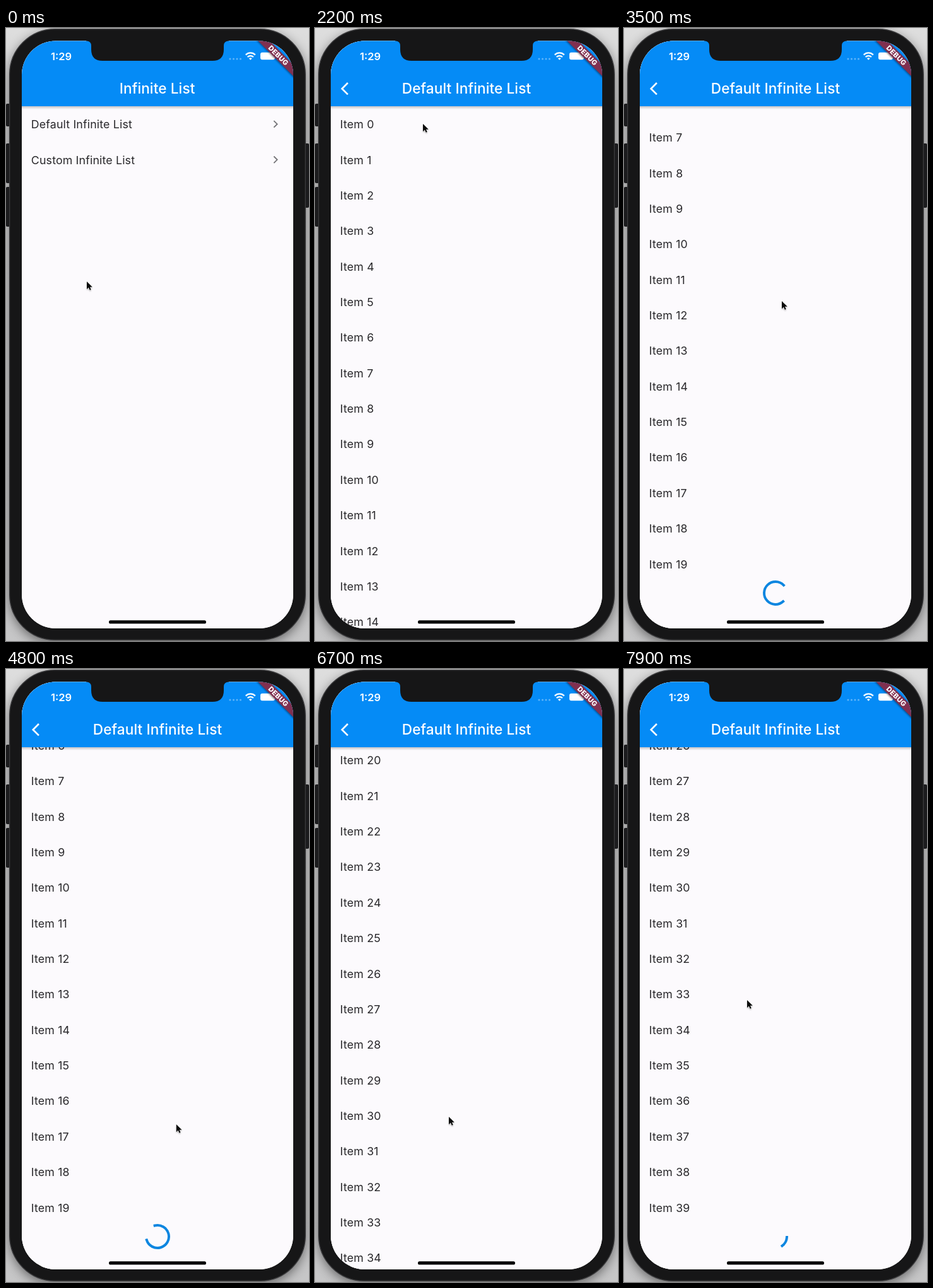
Recreate the animation shown at these times as an HTML page. Size 480 px wide and 972 px high, loop 8000 ms.

```html
<!DOCTYPE html>
<html lang="en">
<head>
<meta charset="utf-8">
<title>Infinite List</title>
<style>
  html, body { margin: 0; width: 100%; height: 100%; overflow: hidden; background: #c4c4c5; }
  svg { display: block; width: 480px; height: 972px; font-family: Inter, Roboto, sans-serif; }
  .row { font-size: 17.8px; letter-spacing: .15px; fill: #29282b; }
  .title { font-size: 22.6px; letter-spacing: .1px; font-weight: 500; fill: #fff; text-anchor: middle; }
  .line { fill: none; stroke-linecap: square; stroke-linejoin: miter; }
</style>
</head>
<body>
<svg viewBox="0 0 480 972">
  <defs>
    <linearGradient id="desk" x2="0" y2="1">
      <stop offset="0" stop-color="#dedede"/>
      <stop offset=".12" stop-color="#cdcdce"/>
      <stop offset="1" stop-color="#c6c6c7"/>
    </linearGradient>
    <linearGradient id="shade" x2="0" y2="1">
      <stop offset="0" stop-color="#000" stop-opacity=".22"/>
      <stop offset="1" stop-color="#000" stop-opacity="0"/>
    </linearGradient>
    <filter id="blur" x="-20%" y="-20%" width="140%" height="140%"><feGaussianBlur stdDeviation="9"/></filter>
    <filter id="soft" x="-50%" y="-50%" width="200%" height="200%"><feGaussianBlur stdDeviation="1.2"/></filter>
    <clipPath id="screen"><rect x="25" y="20.4" width="430" height="931.6" rx="54"/></clipPath>
    <g id="bar">
      <rect x="25" y="20" width="430" height="104" fill="#058bf6"/>
      <rect x="25" y="124" width="430" height="5" fill="url(#shade)"/>
    </g>
    <path id="arrow" d="M0 0V13.2L3.1 10.3L5.2 15L7.4 14L5.4 9.4H9.6Z" transform="scale(.92)"/>
  </defs>

  <!-- phone body -->
  <rect width="480" height="972" fill="url(#desk)"/>
  <rect x="6" y="6" width="468" height="970" rx="73" opacity=".5" filter="url(#blur)"/>
  <g fill="#1b1b1d">
    <rect x="0" y="120" width="8" height="36" rx="2"/>
    <rect x="0" y="183" width="8" height="63" rx="2"/>
    <rect x="0" y="252" width="8" height="63" rx="2"/>
    <rect x="472" y="183" width="8" height="102" rx="2"/>
  </g>
  <rect x="5.7" y="1.7" width="468.6" height="968.6" rx="72" fill="#161617" stroke="#39393b" stroke-width="1.4"/>

  <g clip-path="url(#screen)">
    <rect x="25" y="20" width="430" height="932" fill="#fcfafd"/>
    <g id="home">
      <rect x="25" y="20" width="430" height="932" fill="#fcfafd"/>
      <rect id="press" x="25" y="124" width="430" height="56.4" fill="#000" opacity="0"/>
      <text class="row" x="39.8" y="159.2">Default Infinite List</text>
      <text class="row" x="39.8" y="215.6">Custom Infinite List</text>
      <g class="line" stroke="#77767a" stroke-width="1.9">
        <path d="M425 147.8l4.6 4.6l-4.6 4.6"/>
        <path d="M425 204.2l4.6 4.6l-4.6 4.6"/>
      </g>
      <use href="#bar"/>
      <text class="title" x="239.6" y="104">Infinite List</text>
    </g>
    <g id="page">
      <rect x="25" y="20" width="430" height="932" fill="#fcfafd"/>
      <g id="rows"></g>
      <path id="spinner" class="line" stroke="#0d86e0" stroke-width="4"/>
      <use href="#bar"/>
      <path class="line" d="M51 88L42.8 96.2L51 104.4" stroke="#fff" stroke-width="2.7"/>
      <text class="title" x="240" y="104">Default Infinite List</text>
    </g>

    <!-- status bar -->
    <text x="87.6" y="51" font-size="16.6" font-weight="600" fill="#fff" text-anchor="middle">1:29</text>
    <g fill="#fff" opacity=".35">
      <circle cx="355" cy="49" r="1.6"/><circle cx="360.5" cy="49" r="1.6"/>
      <circle cx="366" cy="49" r="1.6"/><circle cx="371.5" cy="49" r="1.6"/>
    </g>
    <g fill="none" stroke="#fff" stroke-width="2.3">
      <path d="M379.8 42.6A10.5 10.5 0 0 1 394.8 42.6"/>
      <path d="M382.7 46A6.4 6.4 0 0 1 391.9 46"/>
    </g>
    <path d="M384.9 48.2a3.6 3.6 0 0 1 4.8 0L387.3 50.8Z" fill="#fff"/>
    <rect x="403" y="38.8" width="23" height="11.4" rx="3" fill="#fff"/>

    <!-- corner ribbon -->
    <g transform="translate(431.6 43.6) rotate(45)">
      <rect x="-60" y="-6" width="120" height="14" opacity=".4" filter="url(#soft)"/>
      <rect x="-60" y="-6.4" width="120" height="12.8" fill="#803050"/>
      <text y="3.9" font-size="11" letter-spacing=".3" font-weight="800" fill="#fff" text-anchor="middle">DEBUG</text>
    </g>
    <rect x="163" y="939.3" width="154" height="5.2" rx="2.6" fill="#050505"/>
  </g>
  <path d="M127 19V20.4Q135 20.4 135 28V34Q135 52 153 52H327Q345 52 345 34V28Q345 20.4 353 20.4V19Z" fill="#161617"/>

  <g id="cursor">
    <use href="#arrow" y="1.5" opacity=".4" filter="url(#soft)"/>
    <use href="#arrow" fill="#0a0a0a" stroke="#fff" stroke-width="1.2" paint-order="stroke"/>
  </g>
</svg>

<script>
const LOOP = 8000, STEP = 100;
const PITCH = 56.36, FIRST_Y = 153, WIDTH = 430;
const PUSH = 450, PUSH_TIME = 450, FIRST_LOAD = 2050, SECOND_LOAD = 5000;

const scrollTrack = [
  [2820, 0], [2900, 85], [3050, 300], [3180, 425], [3330, 395], [3500, 373.5], [3700, 369.5],
  [5450, 369.5], [5700, 650], [6000, 929], [6250, 1043], [6700, 1135], [6740, 1137],
  [6880, 1240], [7000, 1335], [7250, 1535], [7550, 1504], [7800, 1496.7]
];
const cursorX = [
  [0, 128], [400, 171], [2250, 171], [2750, 262], [3050, 250], [3550, 250],
  [4200, 278], [4750, 270], [5450, 268], [5700, 249], [6050, 249], [6650, 212], [6740, 212], [7000, 195]
];
const cursorY = [
  [0, 402], [400, 152], [2250, 152], [2750, 720], [2820, 720], [3050, 433], [3550, 433],
  [4200, 487], [4750, 722], [5450, 722], [5700, 443], [6050, 443], [6650, 710], [6740, 710], [7000, 525]
];

const $ = id => document.getElementById(id);
const clamp = v => Math.min(1, Math.max(0, v));

// Monotone cubic interpolation through [time, value] points.
function sample(track, t) {
  const last = track.length - 1;
  if (t <= track[0][0]) return track[0][1];
  if (t >= track[last][0]) return track[last][1];
  const i = track.findIndex(p => p[0] > t) - 1;
  const slope = k => k < 0 || k >= last ? 0
    : (track[k + 1][1] - track[k][1]) / (track[k + 1][0] - track[k][0]);
  const tangent = k => {
    const a = slope(k - 1), b = slope(k);
    return a * b > 0 ? 2 * a * b / (a + b) : 0;
  };
  const [t0, v0] = track[i], [t1, v1] = track[i + 1];
  const d = t1 - t0, u = (t - t0) / d, w = 1 - u;
  return v0 * (1 + 2 * u) * w * w + v1 * u * u * (3 - 2 * u)
    + d * u * w * (tangent(i) * w - tangent(i + 1) * u);
}

// cubic-bezier(.4, 0, .2, 1)
function standardEase(x) {
  let lo = 0, hi = 1;
  for (let i = 0; i < 20; i++) {
    const m = (lo + hi) / 2, n = 1 - m;
    if (1.2 * n * n * m + 0.6 * n * m * m + m * m * m < x) lo = m; else hi = m;
  }
  return lo * lo * (3 - 2 * lo);
}

// Material spinner: the head runs out, then the tail catches up.
function drawSpinner(age, y) {
  const p = age % 1333 / 1333;
  const head = standardEase(clamp(p * 2)), tail = standardEase(clamp(p * 2 - 1));
  const start = Math.PI * (-0.5 + 1.5 * tail + 2 * age / 2222 + 0.5 * p);
  const sweep = Math.max(1.5 * Math.PI * (head - tail), 0.001);
  const point = a => `${240 + 18 * Math.cos(a)} ${y + 18 * Math.sin(a)}`;
  $('spinner').setAttribute('d',
    `M${point(start)}A18 18 0 ${sweep > Math.PI ? 1 : 0} 1 ${point(start + sweep)}`);
}

const rows = Array.from({ length: 17 }, () => {
  const row = document.createElementNS('http://www.w3.org/2000/svg', 'text');
  row.setAttribute('class', 'row');
  row.setAttribute('x', 39.8);
  return $('rows').appendChild(row);
});

function drawList(t) {
  const scroll = sample(scrollTrack, t);
  const count = t < FIRST_LOAD ? 0 : t < SECOND_LOAD ? 20 : 40;
  const top = Math.max(0, Math.floor(scroll / PITCH) - 1);
  rows.forEach((row, k) => {
    const i = top + k;
    row.textContent = i < count ? `Item ${i}` : '';
    row.setAttribute('y', FIRST_Y + 6.2 + i * PITCH - scroll);
  });
  const born = count === 0 ? PUSH : count === 20 ? 2900 : 6880;
  const y = count ? FIRST_Y - 10.7 + count * PITCH - scroll : 538;
  $('spinner').style.display = t < born ? 'none' : '';
  if (t >= born) drawSpinner(t - born, y);
}

function draw(t) {
  const push = 1 - (1 - clamp((t - PUSH) / PUSH_TIME)) ** 3;
  $('page').setAttribute('transform', `translate(${WIDTH * (1 - push)} 0)`);
  $('home').setAttribute('transform', `translate(${-WIDTH / 3 * push} 0)`);
  $('press').setAttribute('opacity', t >= 400 && t < 700 ? 0.08 : 0);
  drawList(t);
  $('cursor').setAttribute('transform', `translate(${sample(cursorX, t)} ${sample(cursorY, t)})`);
}

const begin = performance.now();
function tick() {
  const t = (performance.now() - begin) % LOOP;
  draw(Math.floor(t / STEP) * STEP);
  requestAnimationFrame(tick);
}
tick();
</script>
</body>
</html>
```
